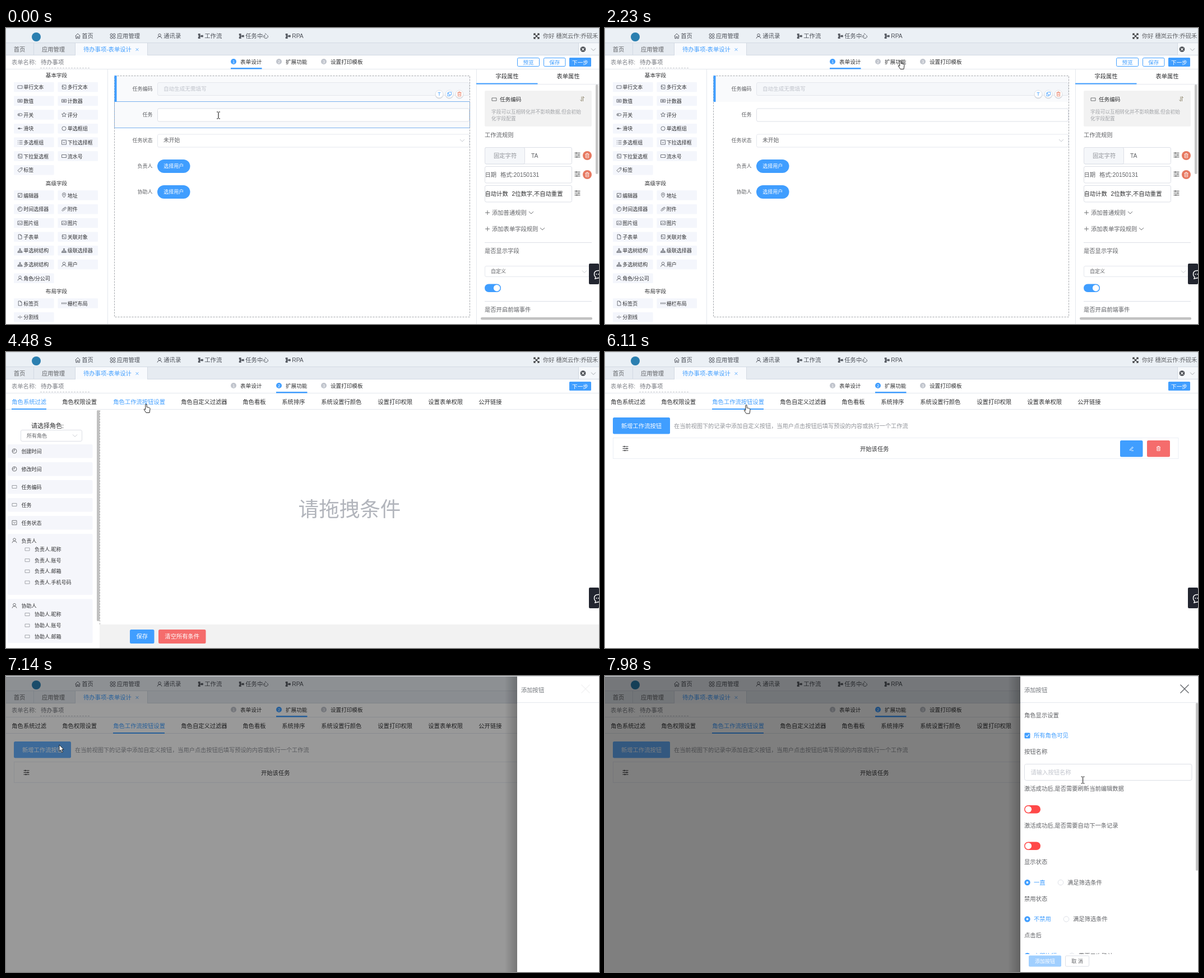
These frames come from a looping animation (1058 px wide and 529 px high, 8 s). An HTML page:

```html
<!DOCTYPE html>
<html lang="zh-CN">
<head>
<meta charset="utf-8">
<title>表单设计</title>
<style>
html, body { margin: 0; width: 100%; height: 100%; overflow: hidden; background: #fff; }
svg { display: block; width: 1058px; height: 529px; }
text { font-family: "Liberation Sans", "Noto Sans CJK SC", "Noto Sans CJK", sans-serif; }
</style>
</head>
<body>
<svg id="stage" viewBox="0 0 1058 529" xmlns="http://www.w3.org/2000/svg"></svg>
<script>
const LOOP = 8000;
const BLUE = '#409eff', INK = '#303133', TEXT = '#606266', MUTED = '#909399',
      PALE = '#c0c4cc', LINE = '#dcdfe6', SOFT = '#e4e7ed', TILE = '#f4f6fc', RED = '#f56c6c';

// Drawing helpers; text is placed by the vertical centre of its glyphs
const text = (x, y, s, size = 10.3, fill = TEXT, anchor = 'start', extra = '') =>
  `<text x="${x}" y="${y + size * 0.37}" font-size="${size}" fill="${fill}" text-anchor="${anchor}" ${extra}>${s}</text>`;
const mid = (x, y, s, size, fill) => text(x, y, s, size, fill, 'middle');
const box = (x, y, w, h, fill = 'none', stroke = 'none', r = 0, extra = '') =>
  `<rect x="${x}" y="${y}" width="${w}" height="${h}" rx="${r}" fill="${fill}" stroke="${stroke}" ${extra}/>`;
const frame = (x, y, w, h, fill = '#fff', stroke = LINE, r = 2.5) => box(x + .5, y + .5, w - 1, h - 1, fill, stroke, r);
const path = (d, stroke = LINE, width = 1, extra = '') =>
  `<path d="${d}" fill="none" stroke="${stroke}" stroke-width="${width}" ${extra}/>`;
const disc = (x, y, r, fill, stroke = 'none') => `<circle cx="${x}" cy="${y}" r="${r}" fill="${fill}" stroke="${stroke}"/>`;
const group = (id, ...parts) => `<g id="${id}">${parts.flat(3).join('')}</g>`;
const ring = (x, y, r) => `M${x - r},${y}a${r},${r} 0 1 0 ${2 * r},0a${r},${r} 0 1 0 ${-2 * r},0`;

const ICONS = {
  home: 'M-4.5,0L0,-4.5L4.5,0M-3.2,-1V4.2H-1V1H1V4.2H3.2V-1',
  grid: ring(-2.5, -2.5, 2) + ring(2.5, -2.5, 2) + ring(-2.5, 2.5, 2) + ring(2.5, 2.5, 2),
  user: ring(0, -1.8, 2.3) + 'M-4,4.2Q-3.6,.8 0,.8T4,4.2',
  flow: 'M-3.5,-3.8h2.4v2h-2.4zM-3.5,1.8h2.4v2h-2.4zM1.8,-1h2.2v2h-2.2zM-2.3,-1.8V1.8M-2.3,0H1.8',
  input: 'M-4,-2.5H4V2.5H-4Z',
  area: 'M-3,-3.5H3.5V3.5H-3ZM-4,-1H0M-1,1H2',
  number: 'M-4,-2.5H4V2.5H-4ZM-2.5,0H2.5M-1,-1.5V1.5M1,-1.5V1.5',
  toggle: 'M-1.8,-2H1.8Q4,-2 4,0T1.8,2H-1.8Q-4,2 -4,0T-1.8,-2' + ring(-1.6, 0, .8),
  star: 'M0,-4L1.2,-1.2L4,-1L1.8,.9L2.5,3.8L0,2.2L-2.5,3.8L-1.8,.9L-4,-1L-1.2,-1.2Z',
  slider: 'M-4,0H4M-3,-1H0V1H-3Z',
  radio: ring(0, 0, 3.6),
  list: 'M-4,-3H-3M-1.5,-3H4.5M-4,0H-3M-1.5,0H4.5M-4,3H-3M-1.5,3H4.5',
  select: 'M-4,-3.8H4V3.8H-4ZM-2,-1L0,1.2L2,-1',
  tag: 'M-4,1L1,-4H4V-1L-1,4Z' + ring(2, -2, .5),
  edit: 'M-3.5,-3.5H3.5V3.5H-3.5ZM-2,2L2,-2M-2,0V2H0',
  place: 'M0,4Q-3.2,.5 -3,-1.5A3,3 0 0 1 3,-1.5Q3.2,.5 0,4' + ring(0, -1.4, 1),
  clock: ring(0, 0, 4) + 'M0,-4V0H-4',
  clip: 'M-3.5,1L1,-3Q3,-4.2 3.8,-2.6T-1,2.6Q-3.5,4.4 -3.6,1.6M-1.5,1L2,-2',
  image: 'M-4,-3.2H4V3.2H-4ZM-3,2L-1,-.5L1,1.5L3,-1',
  doc: 'M-2.8,-4H1L3,-2V4H-2.8ZM1,-4V-2H3',
  tree: 'M-1,-3.5H1V-1.5H-1ZM0,-1.5V1M-3,2V.3H3V2M-4,2h2v1.6h-2zM-1,2h2v1.6h-2zM2,2h2v1.6h-2z',
  split: 'M-4,-1.5V1.5M-2,-1.5V1.5M0,-1.5V1.5M2,-1.5V1.5M4,-1.5V1.5',
  line: 'M-4,0H4M0,-3V-1.5M0,1.5V3',
  sliders: 'M-5,-3.5H5M-5,0H5M-5,3.5H5M-2,-4.7V-2.3M2.5,-1.2V1.2M-1,2.3V4.7',
  trash: 'M-3.5,-2.5H3.5M-1.2,-2.5V-4H1.2V-2.5M-2.6,-2.5V3.8H2.6V-2.5M-.9,-.8V2.2M.9,-.8V2.2',
  copy: 'M-3,-1Q-3,-3.5 0,-3.5H3.5V1.5H-1V-2M-1,-1.5H-3.2V3.5H1.2V1.5',
  pen: 'M-2.5,2L2,-3L3.3,-1.7L-1,3H-2.7ZM0,3.8H4',
  down: 'M-4,-2L0,2L4,-2',
  plus: 'M-4,0H4M0,-4V4',
  cross: 'M-2.4,-2.4L2.4,2.4M2.4,-2.4L-2.4,2.4',
  sort: 'M-1,-4.5V4L-3.5,1.5M1.5,4V-4.5L4,-2',
  full: 'M-4,-4L4,4M4,-4L-4,4M-4.5,-1.5V-4.5H-1.5M1.5,-4.5H4.5V-1.5M4.5,1.5V4.5H1.5M-1.5,4.5H-4.5V1.5'
};
const icon = (name, x, y, color = TEXT, width = .9) =>
  path(ICONS[name], color, width, `transform="translate(${x} ${y})"`);
const button = (x, y, w, h, label, fill, size = 10.3, r = 2.5) =>
  box(x, y, w, h, fill, 'none', r) + mid(x + w / 2, y + h / 2, label, size, '#fff');
const outline = (x, y, w, h, label, color, stroke, size) =>
  frame(x, y, w, h, '#fff', stroke, 2) + mid(x + w / 2, y + h / 2, label, size, color);
const toggle = (x, y, color, on) => box(x, y, 29, 14.5, color, 'none', 7.2) + disc(on ? x + 21.7 : x + 7.3, y + 7.2, 5.8, '#fff');

function header() {
  const menu = [['home', 128, '首页'], ['grid', 190.5, '应用管理'], ['user', 274, '通讯录'],
                ['flow', 347, '工作流'], ['flow', 420, '任务中心'], ['flow', 503, 'RPA']];
  return [
    box(0, 0, 1058, 49, '#ebf0f5'), box(0, 26, 1058, 23, '#e6ebf1'), box(0, 0, 1058, 1, '#d9dde2'),
    disc(54, 16, 8, '#2b7fb0'),
    menu.map(([i, x, s]) => icon(i, x, 14.5, '#4c5058', i === 'flow' ? 1.4 : .9) + text(x + 7.3, 14.5, s, 10.3, '#4c5058')),
    icon('full', 946.5, 14.5, INK, 1.2), text(958, 14.5, '你好 穗岚云作:乔砚禾'),
    path('M0,26.5H1058M0,48.5H1058M49.5,26V48M123.5,26V48M252.5,26V48M1021.5,26V48M1040.5,26V48', '#d3dae3'),
    box(124, 27, 128, 22, '#f8fafd'),
    mid(24, 38, '首页'), mid(84.5, 38, '应用管理'), text(138, 38, '待办事项-表单设计', 10.3, BLUE),
    icon('cross', 234, 38.5, BLUE, .8),
    box(1022, 27, 36, 21, '#f5f8fb'), disc(1029.5, 38, 4.8, '#45494f'), icon('cross', 1029.5, 38, '#fff', 1.2),
    icon('down', 1048, 38.5, MUTED, .8),
    text(10, 61, '表单名称:', 10.3, '#85888e'), text(62, 61, '待办事项', 10.3, '#70737a'),
    path('M61,71.5H151', '#c4c7cd', 1, 'stroke-dasharray="3 2"'),
    path('M0,73.5H1058', SOFT),
    button(1005, 53, 39, 16, '下一步', BLUE, 9.6, 1.5)
  ];
}

const steps = active => [[406, '表单设计'], [487, '扩展功能'], [567, '设置打印模板']].map(([x, s], i) =>
  disc(x, 60, 5, i === active ? BLUE : PALE) + mid(x, 60, i + 1, 7.5, '#fff') + text(x + 12, 60, s, 9.6, INK) +
  (i === active ? box(x - 5, 71, 55.5, 2.5, BLUE) : ''));

function palette() {
  const sections = [
    ['基本字段', 84, 105.5, 'input单行文本 area多行文本 number数值 number计数器 toggle开关 star评分 slider滑块 radio单选框组 list多选框组 select下拉选择框 area下拉复选框 input流水号 tag标签'],
    ['高级字段', 277, 299, 'edit编辑器 place地址 clock时间选择器 clip附件 image图片组 image图片 doc子表单 area关联对象 tree单选树结构 tree级联选择器 tree多选树结构 user用户 user角色/分公司'],
    ['布局字段', 470, 492, 'doc标签页 split栅栏布局 line分割线']
  ];
  return sections.map(([title, ty, top, items]) => mid(90, ty, title, 9.6, INK) +
    items.split(' ').map((item, i) => {
      const [, name, label] = item.match(/^([a-z]+)(.+)$/);
      const x = i % 2 ? 92.5 : 14, y = top + (i >> 1) * 24.7;
      return box(x, y - 8.7, 71.5, 17.5, TILE, 'none', 1) + icon(name, x + 11, y, '#50545b', .8) +
        text(x + 17.3, y + .3, label, 9, INK);
    }).join(''));
}

const formLabel = (y, s) => text(261.5, y, s, 9, TEXT, 'end');

function formRows() {
  return [
    box(193.5, 85.5, 634, 431, '#fff'),
    box(194, 86, 634, 46, '#f9fafc'),
    group('taskHover', box(193.5, 131.5, 634, 47, '#f9fafc', '#79b0ee')),
    box(193.5, 85.5, 634, 431, 'none', '#a3a6ab', 0, 'stroke-dasharray="3 2"'),
    group('codeHover', box(193.5, 85.5, 634, 46, 'none', '#79b0ee')),
    box(193.5, 85, 4, 47, BLUE),
    formLabel(108.5, '任务编码'), frame(270, 97, 557, 24, '#f5f7fa', SOFT), text(281, 108.5, '自动生成无需填写', 9.6, PALE),
    [773, 791, 809].map(x => disc(x, 119, 7.4, '#d5d8dd') + disc(x, 118, 6.8, '#fff', '#e2e4e8')),
    mid(773, 118, 'T', 9, BLUE), icon('copy', 791, 118, BLUE, .8), icon('trash', 809, 118, '#e8795f', .8),
    formLabel(154.5, '任务'), frame(270, 143.5, 557, 24),
    formLabel(200.5, '任务状态'), frame(270, 189.5, 557, 24, '#fff', SOFT), text(281, 200.5, '未开始', 9.8), icon('down', 814, 201, PALE),
    formLabel(246.5, '负责人'), button(270, 235, 58.5, 24, '选择用户', BLUE, 9, 12),
    formLabel(293, '协助人'), button(270, 281, 58.5, 24, '选择用户', BLUE, 9, 12)
  ];
}

function properties() {
  const badge = y => disc(1037, y, 8, '#e77961') + icon('trash', 1037, y, '#fff', .8);
  return [
    path('M839.5,74V529M839,100.5H1058', SOFT), box(839, 98.5, 109.5, 2, BLUE),
    mid(894, 86.5, '字段属性', 10.3, INK), mid(1003, 86.5, '表单属性', 10.3, INK),
    box(854, 112, 191, 64, '#f2f2f2', 'none', 2), icon('input', 871, 127.5, TEXT), text(881, 127.5, '任务编码', 9.6, INK),
    icon('sort', 1028, 127, '#8a7f65'),
    text(866, 150, '字段可以互相转化并不影响数据,但会初始', 8.75, '#a2a4a8'), text(866, 162, '化字段配置', 8.75, '#a2a4a8'),
    text(854, 191, '工作流规则'),
    [213, 247, 281].map(y => frame(854, y, 156, 30.5) + icon('sliders', 1019.5, y + 14, INK)),
    frame(854, 213, 72, 30.5, '#f5f7fa'), text(870, 228, '固定字符', 10.3, MUTED), text(937, 228, 'TA'), badge(228),
    text(854.5, 262, '日期'), text(882, 262, '格式:20150131'), badge(262),
    text(854.5, 296, '自动计数', 10.3, INK), text(902.5, 296, '2位数字,不自动重置', 10.3, INK),
    [[330, '添加普通规则', 937], [359, '添加表单字段规则', 957]].map(([y, s, x]) =>
      icon('plus', 859, y) + text(867, y, s) + icon('down', x, y)),
    path('M854,383.5H1045M854,488.5H1045'),
    text(854, 398, '是否显示字段'), frame(854, 425, 187, 20, '#fff', SOFT), text(865, 435, '自定义', 9), icon('down', 1032, 435.5, PALE),
    toggle(854, 457.5, BLUE, true), text(854, 503, '是否开启前端事件'),
    box(847, 517, 199, 4.5, '#c1c1c1', 'none', 2), box(1052, 101, 4.5, 160, '#c5c5c5', 'none', 2)
  ];
}

const TABS = [[10, '角色系统过滤'], [100, '角色权限设置'], [191, '角色工作流按钮设置'], [312, '角色自定义过滤器'], [422, '角色看板'],
              [492, '系统排序'], [562, '系统设置行颜色'], [663, '设置打印权限'], [753, '设置表单权限'], [843, '公开链接']];
const tabs = () => [
  path('M0,102.5H1058', SOFT),
  TABS.map(([x, s], i) => text(x + .3, 89, s, 10.3, INK, 'start', `id="tab${i}"`)),
  box(0, 101, 1, 2, BLUE, 'none', 0, 'id="tabBar"')
];

function filters() {
  const fields = [['clock', '创建时间'], ['clock', '修改时间'], ['input', '任务编码'], ['input', '任务'], ['select', '任务状态']];
  const person = (y, h, name, subs) => box(3, y, 151.5, h, '#f5f6fb', 'none', 2) + icon('user', 15, y + 12, TEXT) +
    text(27.5, y + 12.5, name, 9, INK) +
    subs.map((s, i) => icon('input', 38, y + 27.5 + i * 19.7, MUTED, .8) + text(51, y + 27.5 + i * 19.7, name + '.' + s, 9, INK)).join('');
  return [
    text(45, 132, '请选择角色:', 11, INK), frame(26, 139, 110, 21), text(37, 149.5, '所有角色', 9), icon('down', 123, 149.5, PALE),
    fields.map(([i, s], k) => box(3, 165 + k * 32, 151.5, 24.5, '#f5f6fb', 'none', 2) +
      icon(i, 15, 177 + k * 32, i === 'input' ? MUTED : TEXT) + text(27.5, 177.5 + k * 32, s, 9, INK)),
    person(325, 109, '负责人', ['昵称', '账号', '邮箱', '手机号码']),
    person(441.5, 78.5, '协助人', ['昵称', '账号', '邮箱']),
    box(162, 104, 5, 377, '#c1c1c1', 'none', 2), path('M167.5,104V487', '#b5b5b5', 1, 'stroke-dasharray="3 2"'),
    mid(613, 280, '请拖拽条件', 36.6, '#b2b5bc'),
    box(167, 487, 891, 42, '#f2f2f2'),
    button(221, 496, 43.5, 25, '保存', BLUE), button(272, 496, 84.5, 25, '清空所有条件', RED)
  ];
}

const workflowButtons = () => [
  box(14, 117, 102, 29.5, BLUE, 'none', 2.5, 'id="addButton"'), mid(65, 132, '新增工作流按钮', 10.3, '#fff'),
  text(123, 132, '在当前视图下的记录中添加自定义按钮，当用户点击按钮后填写预设的内容或执行一个工作流', 10.2, MUTED),
  frame(14, 153, 1009.5, 38, '#fff', '#ebeef5', 0), icon('sliders', 36.5, 172.5, INK, 1.1), text(455, 173, '开始该任务', 10.3, INK),
  button(919, 158, 40.5, 29.5, '', BLUE), icon('pen', 939, 172.5, '#fff'),
  button(967, 158, 41, 29.5, '', RED), icon('trash', 987.5, 172.5, '#fff')
];

// Drawer coordinates start at its own left edge
function drawerContent() {
  const labels = [[70, '角色显示设置'], [135.5, '按钮名称'], [201, '激活成功后,是否需要刷新当前编辑数据'],
                  [267, '激活成功后,是否需要自动下一条记录'], [332.5, '显示状态'], [398, '禁用状态'], [463.5, '点击后']];
  const radios = (y, on, x, off) => disc(12.5, y, 5.2, BLUE) + disc(12.5, y, 1.9, '#fff') + text(24, y, on, 10.3, BLUE) +
    disc(x, y, 4.8, '#fff', LINE) + text(x + 12, y, off);
  return [
    labels.map(([y, s]) => text(7, y, s)),
    box(7.5, 101.5, 10, 10, BLUE, 'none', 1.5), path('M9.8,106.5L12,108.7L15.6,104.2', '#fff', 1.1), text(24, 106.5, '所有角色可见', 10.3, BLUE),
    frame(7, 157, 299.5, 30, '#fff', LINE, 3), text(18.5, 172.5, '请输入按钮名称', 10.3, PALE),
    toggle(7, 231, '#ff4949'), toggle(7, 296.5, '#ff4949'),
    radios(369, '一直', 72, '满足筛选条件'), radios(434.5, '不禁用', 82, '满足筛选条件'),
    `<g clip-path="url(#scrollArea)">${radios(500, '立即执行', 92, '需要二次确认')}</g>`,
    button(15, 499.5, 58, 20, '添加按钮', '#a0cfff', 9, 2), outline(80, 499.5, 43, 20, '取 消', TEXT, LINE, 9),
    box(313, 48, 4, 300, '#c4c4c4', 'none', 2)
  ];
}

stage.innerHTML = [
  `<defs><clipPath id="scrollArea"><path d="M0,48H317V497H0Z"/></clipPath>
   <linearGradient id="shade"><stop offset="0" stop-opacity="0"/><stop offset="1" stop-opacity=".22"/></linearGradient></defs>`,
  box(0, 0, 1058, 529, '#fff'), header(),
  group('design', steps(0), outline(912, 53, 40, 16, '预览', BLUE, BLUE, 9.6), outline(959, 53, 39.5, 16, '保存', BLUE, BLUE, 9.6),
    path('M181.5,74V529', SOFT), palette(), formRows(), properties()),
  group('extend', steps(1), tabs()),
  group('filterPage', filters()),
  group('buttonPage', workflowButtons()),
  box(1040, 421, 18, 37, '#22252f', 'none', 2),
  path('M1058,433.5Q1049.5,433 1049.5,440Q1049.5,443.5 1052,445L1051,448L1058,446.5', '#fff', 1.4), disc(1053.5, 440, .9, '#fff'), disc(1057, 440, .9, '#fff'),
  group('mask', box(0, 1, 1058, 528, '#000')),
  group('drawer', box(-22, 1, 22, 528, 'url(#shade)'), box(0, 1, 317, 528, '#fff'), path('M0,47.5H317', SOFT),
    text(7, 25, '添加按钮', 10.3, '#72767b'), group('drawerBody', drawerContent())),
  group('closeMark', path('M1026.5,15.5L1041.5,30.5M1041.5,15.5L1026.5,30.5', '#5c5f64', 1.3)),
  group('cursor',
    group('beam', path('M-3,-6H-.7M.7,-6H3M0,-5.5V5.5M-3,6H-.7M.7,6H3', '#111', 1.1)),
    group('hand', '<path d="M-1.2,1Q0,-.8 1.2,1V5.4L5.6,6.4Q7.2,7 7,8.8L6,15.5H0L-4,9.6Q-3.6,7.8 -1.2,10Z" fill="#fff" stroke="#111" stroke-width=".9"/>'),
    group('arrow', '<path d="M0,0V11.4L2.6,9L4.4,13.6L6.4,12.8L4.6,8.4H8Z" fill="#fff" stroke="#111" stroke-width=".9"/>'))
].flat(3).join('');

// Timeline: rows of [ms, value, easing?]; the first and last values extend to the loop's ends
function track(id, prop, rows, easing = 'linear') {
  const all = [...rows];
  if (all[0][0] > 0) all.unshift([0, all[0][1]]);
  if (all.at(-1)[0] < LOOP) all.push([LOOP, all.at(-1)[1]]);
  document.getElementById(id).animate(
    all.map(([ms, value, ease]) => ({ offset: ms / LOOP, [prop]: value, easing: ease || easing })),
    { duration: LOOP, iterations: Infinity });
}
const hold = (id, prop, rows) => track(id, prop, rows, 'steps(1)');
function show(id, ...spans) {
  const rows = spans.flatMap(([from, to]) => [[from, 1], [to, 0]]);
  hold(id, 'opacity', spans[0][0] > 0 ? [[0, 0], ...rows] : rows);
}
const move = (x, y) => `translate(${x}px, ${y}px)`;

show('design', [0, 2330]);
show('extend', [2330, LOOP]);
show('filterPage', [2330, 5260]);
show('buttonPage', [5330, LOOP]);
show('taskHover', [0, 620]);
show('codeHover', [620, 1020], [1340, 1580]);

hold('tab0', 'fill', [[0, BLUE], [5260, INK]]);
hold('tab1', 'fill', [[0, INK], [3640, BLUE], [3890, INK]]);
hold('tab2', 'fill', [[0, INK], [3950, BLUE], [4030, INK], [4400, BLUE]]);
hold('tab3', 'fill', [[0, INK], [4040, BLUE], [4390, INK]]);
track('tabBar', 'transform', [
  [5260, 'translate(10px, 0px) scaleX(62)', 'cubic-bezier(.645,.045,.355,1)'],
  [5570, 'translate(191px, 0px) scaleX(92)']]);
hold('addButton', 'fill', [[0, BLUE], [6360, '#66b1ff']]);

track('mask', 'opacity', [[6950, 0], [7140, .4], [7220, .4], [7320, .5]]);
track('drawer', 'transform', [[0, 1090], [6970, 1090], [7140, 912], [7219, 912], [7220, 850], [7380, 741]].map(([ms, x]) => [ms, move(x, 0)]));
show('drawerBody', [7380, LOOP]);
track('closeMark', 'opacity', [[7130, 0], [7140, .08], [7220, .08], [7420, 1]]);

track('cursor', 'transform', [
  [420, 379, 156], [1180, 520, 60], [1250, 520, 60], [1420, 545, 92], [1700, 527, 58],
  [2330, 527, 58], [3010, 434, 62], [3050, 432, 62], [3400, 116, 63], [3480, 116, 63], [3790, 132, 93],
  [3870, 132, 93], [4090, 350, 94], [4320, 350, 94], [4480, 250, 93], [5880, 250, 93], [5960, 252, 94.5],
  [6190, 252, 94.5], [6500, 95, 123], [7360, 95, 123], [7660, 789, 201], [7760, 789, 201], [7970, 852.5, 186]
].map(([ms, x, y]) => [ms, move(x, y)]));
show('beam', [0, 530], [3320, 3560], [7600, LOOP]);
show('hand', [1080, 1290], [1620, 2640], [3560, 6900]);
show('arrow', [530, 1080], [1290, 1620], [2640, 3320], [6900, 7600]);
</script>
</body>
</html>
```
